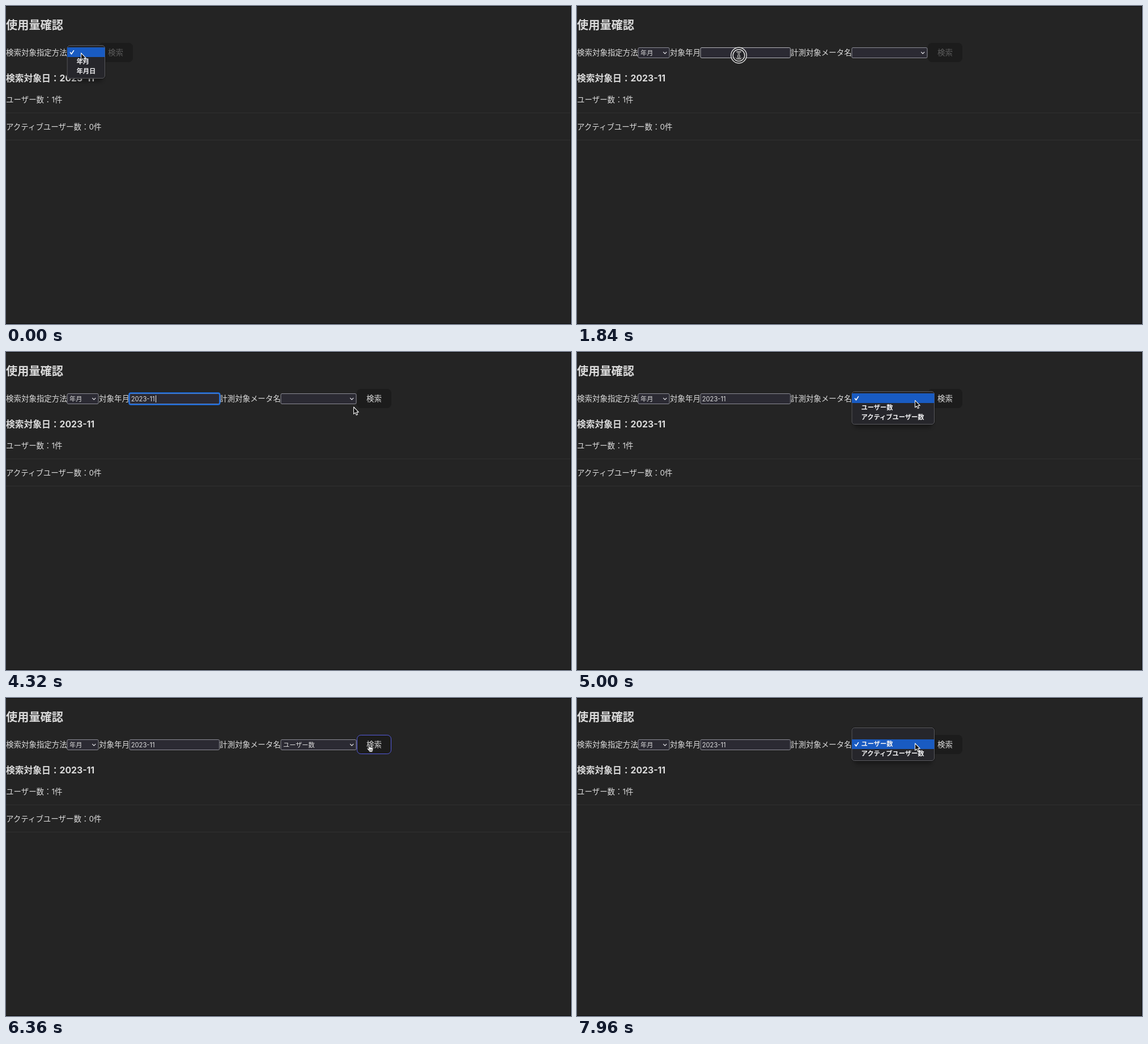
An HTML page for the animation above (8000 ms loop, 997x561 px).

```html
<!DOCTYPE html>
<html lang="ja">
<head>
<meta charset="utf-8">
<style>
html, body { margin: 0; width: 100%; height: 100%; overflow: hidden; background: #242424; }
svg { display: block; width: 100vw; height: 100vh; }
text { font-family: Inter, "Noto Sans CJK JP", "Noto Sans CJK", sans-serif; fill: #dcdcdc; white-space: pre; }
.title { font-size: 20.2px; font-weight: 700; }
.head { font-size: 15.75px; font-weight: 700; }
.body { font-size: 13.47px; }
.field { font-size: 11.2px; }
.option { font-size: 11.25px; font-weight: 600; fill: #f0f0f2; }
.entry { font-size: 10.1px; font-weight: 600; }
</style>
</head>
<body>
<svg id="stage" viewBox="0 0 997 561" preserveAspectRatio="none"></svg>
<script>
const LOOP = 8000;
const stage = document.getElementById('stage');

function make(parent, tag, attrs = {}, content = '') {
  const el = document.createElementNS('http://www.w3.org/2000/svg', tag);
  for (const key in attrs) el.setAttribute(key, attrs[key]);
  if (content) el.textContent = content;
  parent.appendChild(el);
  return el;
}
const group = (parent = stage) => make(parent, 'g');
const rect = (parent, x, y, width, height, fill, more = {}) =>
  make(parent, 'rect', { x, y, width, height, fill, ...more });
const text = (parent, x, y, cls, str) => make(parent, 'text', { x, y, class: cls }, str);
const line = (parent, d, stroke, width) =>
  make(parent, 'path', { d, fill: 'none', stroke, 'stroke-width': width, 'stroke-linecap': 'round', 'stroke-linejoin': 'round' });
const show = (el, on) => el.setAttribute('display', on ? 'inline' : 'none');
const move = (el, x, y) => el.setAttribute('transform', `translate(${x} ${y})`);

const box = (parent, x, width) =>
  rect(parent, x + .5, 73.5, width - 1, 18, '#2b2a33', { rx: 2, stroke: '#8c8c96' });
function select(parent, x, width) {
  box(parent, x, width);
  line(parent, `M${x + width - 11} 81.4l2.7 2.7l2.7 -2.7`, '#e4e4e8', 1.3);
}

// Native popup: rows are 17 px high with 4 px of padding
function menu(x, y, width, options, checked) {
  const g = group();
  const height = 8 + 17 * options.length;
  rect(g, x + 4, y + 6, width - 8, height, '#000', { rx: 6, opacity: .3, filter: 'url(#soft)' });
  rect(g, x - .5, y - .5, width + 1, height + 1, '#101011', { rx: 5 });
  rect(g, x + .5, y + .5, width - 1, height - 1, '#26262b', { rx: 4.5, stroke: '#5c5c60' });
  const mark = rect(g, x + .5, y + 4, width - 1, 17, '#195bc2');
  options.forEach((name, i) => text(g, x + 17, y + 16.3 + 17 * i, 'option', name));
  line(g, `M${x + 6} ${y + 13 + 17 * checked}l2 2.8l4 -6.2`, '#fff', 1.6);
  return { g, highlight: row => mark.setAttribute('y', y + 4 + 17 * row) };
}

const defs = make(stage, 'defs');
const soft = make(defs, 'filter', { id: 'soft', x: '-30%', y: '-30%', width: '160%', height: '160%' });
make(soft, 'feGaussianBlur', { stdDeviation: 3 });

// Page
rect(stage, 0, 0, 997, 561, '#242424');
text(stage, 0, 40.5, 'title', '使用量確認');
text(stage, 0, 86.5, 'body', '検索対象指定方法');
text(stage, 0, 133, 'head', '検索対象日：2023-11');
text(stage, 0, 169.5, 'body', 'ユーザー数：1件');
rect(stage, 0, 188, 996, 1, '#303030');
const activeRow = group();
text(activeRow, 0, 217.5, 'body', 'アクティブユーザー数：0件');
rect(activeRow, 0, 236, 996, 1, '#303030');

select(stage, 107.5, 56);

const button = group();
const buttonFace = rect(button, .5, 65.5, 60, 33, '#1c1c1c', { rx: 6.7 });
const buttonText = text(button, 17, 86.5, 'body', '検索');

const form = group();
text(form, 112, 86.7, 'field', '年月');
text(form, 164, 86.5, 'body', '対象年月');
const dateBox = box(form, 217.5, 159.5);
text(form, 377, 86.5, 'body', '計測対象メータ名');
select(form, 484.5, 134);
const focus = rect(form, 217.3, 72.3, 160, 20.4, 'none', { rx: 3, stroke: '#1b6fe6', 'stroke-width': 2.2 });
const dateText = text(form, 220.7, 86.7, 'field', '2023-11');
const caret = rect(form, 264, 76.5, 1, 12.5, '#f4f4f4');
const meterText = text(form, 489, 86.7, 'field', 'ユーザー数');

const list = group();
rect(list, 217, 92.5, 160.5, 68.5, '#1c1c1d', { stroke: '#0d0d0d' });
const listMark = rect(list, 218, 93, 158.5, 17, '#404143');
['2023-11', '2023-10', '2023-09', '2023-11-14'].forEach((d, i) => text(list, 222.4, 105 + 17 * i, 'entry', d));

const methodMenu = menu(107.5, 69, 67.5, ['', '年月', '年月日'], 0);
const meterMenu = menu(484.5, 69, 146.5, ['', 'ユーザー数', 'アクティブユーザー数'], 0);
const meterAgain = menu(484.5, 52, 146.5, ['', 'ユーザー数', 'アクティブユーザー数'], 1);

// Pointer
const pointer = group();
const ring = group(pointer);
make(ring, 'circle', { r: 13.8, fill: '#1c1c1e', 'fill-opacity': .55, stroke: '#e2e2e2', 'stroke-width': 1.4 });
make(ring, 'circle', { r: 10.3, fill: 'none', stroke: '#e2e2e2', 'stroke-width': 1.4 });
const arrow = make(pointer, 'path', {
  d: 'M.5 0V12.4L3.4 9.9L5.3 14.2L7.4 13.3L5.6 9.1H9.3Z',
  fill: '#0a0a0a', stroke: '#f2f2f2', 'stroke-width': 1.1, 'stroke-linejoin': 'round'
});
const beam = group(pointer);
const beamPath = 'M-2.8 -6Q0 -6 0 -4Q0 -6 2.8 -6M0 -4V4M-2.8 6Q0 6 0 4Q0 6 2.8 6M-1.5 1.5H1.5';
line(beam, beamPath, '#f0f0f0', 2.6);
line(beam, beamPath, '#111', 1);
const hand = group(pointer);
make(hand, 'path', {
  d: 'M-.8 .5Q.3 -1.2 1.3 .5V4.5Q2.7 3.7 3.6 5Q5 4.4 5.7 5.6Q7.2 5.3 7.4 7V9.3Q7.2 11 6.3 12V13.4H.4V12.2L-3.4 7.7Q-3.5 6.2 -2 6.5L-.8 7.8Z',
  fill: '#f4f4f4', stroke: '#111', 'stroke-width': .9, 'stroke-linejoin': 'round'
});
line(hand, 'M1.5 8.5V11.5M3.4 8.5V11.5M5.2 8.5V11.5', '#222', .6);

rect(stage, 0, 0, 997, 1, '#0e0e0e');
rect(stage, 996, 0, 1, 561, '#0e0e0e');
rect(stage, 0, 560, 997, 1, '#0e0e0e');

// Time, x, y
const path = [
  [0, 132, 83], [320, 132, 83], [640, 135, 95], [1040, 135, 95],
  [1760, 285.5, 87], [2280, 285.5, 87], [2960, 293.5, 106], [3440, 293.5, 106],
  [4320, 613, 97], [4640, 597, 83], [4840, 597, 83], [5400, 592, 95],
  [5760, 592, 95], [6120, 640.5, 82], [6560, 640.5, 82], [7040, 596, 80], [LOOP, 596, 80]
];
const clicks = [660, 1800, 3300, 4680, 5660, 6380, 7850];

function pointerAt(t) {
  const i = path.findIndex(p => p[0] > t);
  const [t0, x0, y0] = path[i - 1], [t1, x1, y1] = path[i];
  const u = (t - t0) / (t1 - t0), k = u * u * (3 - 2 * u);
  return [x0 + (x1 - x0) * k, y0 + (y1 - y0) * k];
}

function draw(t) {
  const within = (a, b) => t >= a && t < b;
  const [x, y] = pointerAt(t);
  const chosen = t >= 800, filled = t >= 3360;
  const methodOpen = !chosen, listOpen = within(2200, 3400);
  const meterOpen = within(4760, 5800), againOpen = t >= 7900;
  const focused = within(1880, 4720);

  show(activeRow, t < 7400);
  show(form, chosen);
  show(focus, focused);
  show(dateText, filled);
  show(caret, filled && focused && (t - 3320) % 1000 < 500);
  show(meterText, t >= 5800);

  show(list, listOpen);
  show(listMark, y > 93);
  show(methodMenu.g, methodOpen);
  methodMenu.highlight(y > 90 ? 1 : 0);
  show(meterMenu.g, meterOpen);
  meterMenu.highlight(y > 90 ? 1 : 0);
  show(meterAgain.g, againOpen);
  meterAgain.highlight(1);

  const onButton = filled && !meterOpen && x > 619 && y > 65 && y < 99;
  const onInput = chosen && !listOpen && x > 218 && x < 377 && y > 73 && y < 92;
  move(button, chosen ? 619 : 163, 0);
  buttonFace.setAttribute('stroke', onButton ? '#555ce0' : '#1c1c1c');
  buttonText.style.fill = filled ? '#dcdcdc' : '#5c5c5c';
  dateBox.setAttribute('stroke', onInput ? '#b4b4ba' : '#8c8c96');

  move(pointer, x, y);
  show(arrow, !onButton && !onInput);
  show(beam, onInput);
  show(hand, onButton);
  show(ring, clicks.some(c => within(c, c + 110)));
}

function tick(now) {
  draw(now % LOOP);
  requestAnimationFrame(tick);
}
draw(0);
requestAnimationFrame(tick);
</script>
</body>
</html>
```
